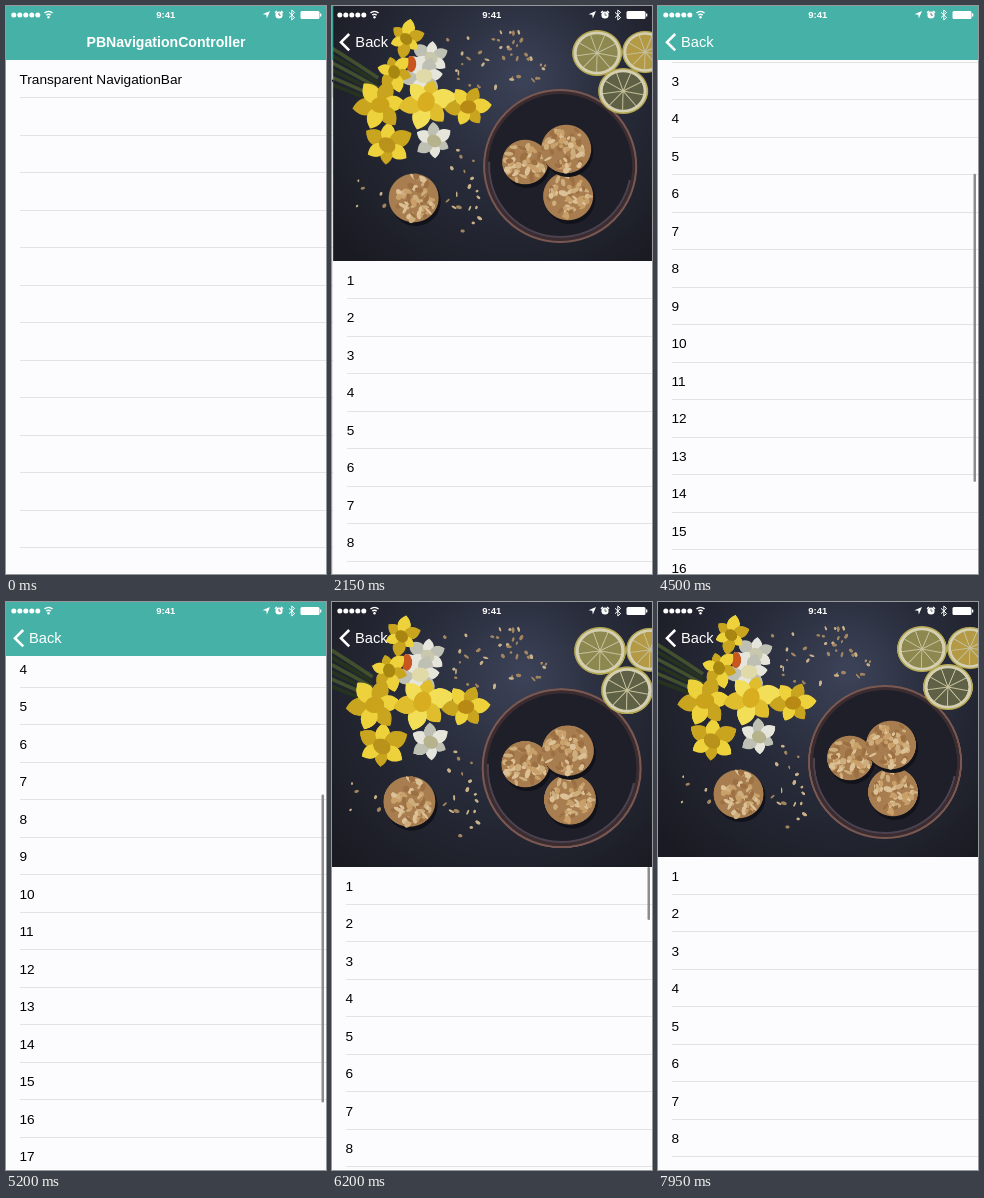
An HTML page with a canvas for the animation above (8000 ms loop, 320 by 568 pixels).

```html
<!DOCTYPE html>
<html lang="en">
<head>
<meta charset="utf-8">
<title>Navigation bar transition</title>
<style>
  html, body { margin: 0; width: 100%; height: 100%; overflow: hidden; background: #fcfcfe; }
  canvas { display: block; }
</style>
</head>
<body>
<canvas id="stage" width="320" height="568"></canvas>
<script>
const W = 320, H = 568, LOOP = 8000, ROW = 37.5, BAR = 54, HEADER = 255, ROWS = 20;
const TEAL = '#46b2a7', PAPER = '#fcfcfe', LINE = '#e3e3e2';
const SANS = '"Liberation Sans", Arial, sans-serif';
const ctx = document.getElementById('stage').getContext('2d');
const clamp = v => Math.max(0, Math.min(1, v));

function seeded(seed) {
  return () => (seed = (seed * 16807) % 2147483647) / 2147483647;
}

function ellipse(c, x, y, rx, ry, fill, angle = 0) {
  c.fillStyle = fill;
  c.beginPath();
  c.ellipse(x, y, rx, ry, angle, 0, 7);
  c.fill();
}

function stroke(c, color, width, path) {
  c.strokeStyle = color;
  c.lineWidth = width;
  c.beginPath();
  path(c);
  c.stroke();
}

// Header picture, 3:2, painted once at double size
const PHOTO_W = HEADER * 1.5;
const photo = paintPhoto();

function paintPhoto() {
  const canvas = document.createElement('canvas');
  canvas.width = PHOTO_W * 2;
  canvas.height = HEADER * 2;
  const c = canvas.getContext('2d'), rnd = seeded(77);
  c.scale(2, 2);
  c.translate((PHOTO_W - W) / 2, 0);
  const table = c.createRadialGradient(190, 70, 10, 170, 90, 220);
  table.addColorStop(0, '#3b4156');
  table.addColorStop(.4, '#292d3c');
  table.addColorStop(1, '#1a1b22');
  c.fillStyle = table;
  c.fillRect(-40, 0, 400, HEADER);

  const crumbs = (n, x, y, w, h) => {
    for (let i = 0; i < n; i++)
      ellipse(c, x + rnd() * w, y + rnd() * h, 1 + rnd() * 2, .8 + rnd(), rnd() < .5 ? '#a08560' : '#c9b189', rnd() * 3);
  };
  crumbs(46, 114, 26, 98, 56);
  crumbs(18, 102, 142, 45, 85);
  crumbs(5, 18, 160, 40, 45);

  for (let i = 0; i < 6; i++)
    stroke(c, i % 2 ? '#26331f' : '#42502d', 3.5, p => {
      p.moveTo(-35, 22 + i * 9);
      p.quadraticCurveTo(5, 45 + i * 7, 45, 72 + i * 5);
    });

  // Six pointed petals of uneven length around a trumpet
  const flower = (x, y, r, light, dark, heart) => {
    for (let i = 0; i < 6; i++) {
      const a = i * Math.PI / 3 + x, len = r * (.8 + rnd() * .35);
      c.save();
      c.translate(x, y);
      c.rotate(a);
      c.fillStyle = i % 2 ? light : dark;
      c.beginPath();
      c.moveTo(0, 0);
      c.quadraticCurveTo(len * .55, -len * .62, len, 0);
      c.quadraticCurveTo(len * .55, len * .62, 0, 0);
      c.fill();
      c.restore();
    }
    ellipse(c, x, y, r * .36, r * .3, heart, x);
  };
  const white = ['#e6e5dc', '#bfc0b4'], yellow = ['#eed23c', '#c9a41f'];
  flower(98, 52, 19, ...white, '#c9c8ac');
  flower(91, 70, 23, ...white, '#e0d9a8');
  flower(101, 135, 20, ...white, '#b5b28c');
  flower(73, 33, 18, ...yellow, '#a98612');
  ellipse(c, 78, 58, 5, 8, '#c8561f');
  flower(61, 66, 19, ...yellow, '#a9880f');
  flower(54, 139, 24, ...yellow, '#b8921a');
  flower(47, 99, 26, ...yellow, '#cba31b');
  flower(93, 96, 28, '#f3df57', '#dfbd2c', '#d8ad20');
  flower(135, 101, 22, ...yellow, '#b88a14');

  ellipse(c, 227, 160, 77, 77, '#3a2c30');
  ellipse(c, 227, 160, 72, 72, '#1e1f28');
  stroke(c, '#7a5852', 2, p => p.arc(227, 160, 76, 0, 7));
  stroke(c, '#4d4250', 2, p => p.arc(227, 160, 71, .2, 3.2));

  const cookie = (x, y, r) => {
    ellipse(c, x + 2, y + 3, r, r, '#12131a');
    ellipse(c, x, y, r, r * .97, '#a87d4f');
    for (let i = 0; i < 60; i++) {
      const a = rnd() * 7, d = Math.sqrt(rnd()) * r * .87;
      ellipse(c, x + Math.cos(a) * d, y + Math.sin(a) * d, 1.8 + rnd() * 3, 1.2 + rnd() * 1.8,
        ['#dcc096', '#c9a06a', '#cfae7e', '#9c7043'][i % 4], rnd() * 3);
    }
  };
  cookie(80.5, 192, 25);
  cookie(192, 156, 23);
  cookie(235, 190, 25);
  cookie(233, 143, 25);

  const lemon = (x, y, r, flesh) => {
    ellipse(c, x, y, r, r * .92, '#b3a650');
    ellipse(c, x, y, r * .94, r * .86, '#d3cfb0');
    ellipse(c, x, y, r * .82, r * .75, flesh);
    stroke(c, '#c4bf9a', 1, p => {
      for (let i = 0; i < 9; i++) {
        const a = i * Math.PI * 2 / 9 + .2;
        p.moveTo(x, y);
        p.lineTo(x + Math.cos(a) * r * .82, y + Math.sin(a) * r * .75);
      }
    });
  };
  lemon(264, 47, 25, '#8c8850');
  lemon(312, 46, 23, '#b59a45');
  lemon(290, 85, 25, '#5f6146');
  return canvas;
}

function text(str, x, y, size, color = '#000', weight = 'normal', align = 'left') {
  ctx.font = `${weight} ${size}px ${SANS}`;
  ctx.fillStyle = color;
  ctx.textAlign = align;
  ctx.fillText(str, x, y);
}

function rect(x, y, w, h, color) {
  ctx.fillStyle = color;
  ctx.fillRect(x, y, w, h);
}

function rows(top, count, label) {
  for (let i = 0; i < count; i++) {
    const y = top + i * ROW;
    if (y > H || y < -ROW) continue;
    rect(14, Math.round(y + ROW - .5), W - 14, 1, LINE);
    text(label(i), 13.5, y + 23.6, 13.65);
  }
}

// Scroll offset through time: [ms, px]
const SCROLL = [[3250, 0], [3600, 1], [3900, 37.5], [4200, 152], [4500, 273.5], [4800, 325], [5150, 328],
  [5450, 242], [5700, 127], [5950, 10], [6080, -13], [6200, -10], [6450, -2], [6750, 0], [8000, 0]];

function scrollAt(t) {
  const i = SCROLL.findIndex(p => p[0] > t);
  if (i < 1) return 0;
  const slope = k => {
    const a = SCROLL[k - 1], b = SCROLL[k + 1];
    return a && b ? (b[1] - a[1]) / (b[0] - a[0]) : 0;
  };
  const [t0, v0] = SCROLL[i - 1], [t1, v1] = SCROLL[i];
  const d = t1 - t0, u = (t - t0) / d, w = 1 - u;
  return w * w * (1 + 2 * u) * v0 + u * u * (3 - 2 * u) * v1 + u * w * d * (w * slope(i - 1) - u * slope(i));
}

function menuScreen(highlight) {
  rect(0, 0, W, H, PAPER);
  if (highlight) rect(0, BAR, W, ROW, '#d9d9d9');
  rows(BAR, 14, i => i ? '' : 'Transparent NavigationBar');
  rect(0, 0, W, BAR, TEAL);
}

function detailScreen(offset, indicator) {
  const edge = HEADER - offset;
  rect(0, 0, W, H, PAPER);
  rows(edge, ROWS, i => i + 1);
  if (edge > 0) {
    const scale = Math.max(edge / HEADER, W / PHOTO_W);
    const w = PHOTO_W * scale, h = HEADER * scale;
    ctx.save();
    ctx.beginPath();
    ctx.rect(0, 0, W, edge);
    ctx.clip();
    ctx.drawImage(photo, (W - w) / 2, (edge - h) / 2, w, h);
    ctx.restore();
  }
  if (indicator) {
    // The bar shrinks further while the list is pulled past its top
    const bottom = 328 + .54 * offset + Math.min(0, offset) * .46, top = Math.max(edge, bottom - 308);
    ctx.globalAlpha = indicator;
    ctx.fillStyle = '#8c8c8c';
    ctx.beginPath();
    ctx.roundRect(315.5, top, 2.5, bottom - top, 1.2);
    ctx.fill();
    ctx.globalAlpha = 1;
  }
  if (edge < BAR) rect(0, 0, W, BAR, TEAL);
}

function statusBar() {
  const white = '#fff';
  for (let i = 0; i < 5; i++) ellipse(ctx, 7.8 + i * 6, 9, 2.5, 2.5, white);
  for (const r of [3.2, 6]) stroke(ctx, white, 1.5, p => p.arc(42.5, 11.5, r, -2.3, -.84));
  ellipse(ctx, 42.5, 11.2, 1.2, 1.2, white);
  text('9:41', 159.7, 12.3, 9.5, white, 'bold', 'center');
  ctx.beginPath();
  for (const [x, y] of [[264, 5], [260.8, 12.5], [260.3, 8.8], [256.5, 8.3]]) ctx.lineTo(x, y);
  ctx.fill();
  ellipse(ctx, 273, 9, 3.6, 3.6, white);
  stroke(ctx, white, 1.4, p => {
    p.moveTo(269, 6.8); p.lineTo(271, 5);
    p.moveTo(277, 6.8); p.lineTo(275, 5);
  });
  stroke(ctx, '#5b7772', .9, p => { p.moveTo(273, 6.8); p.lineTo(273, 9.2); p.lineTo(274.8, 9.2); });
  stroke(ctx, white, 1, p => {
    for (const [x, y] of [[283, 6.3], [288.6, 11.6], [285.8, 14], [285.8, 4], [288.6, 6.4], [283, 11.7]]) p.lineTo(x, y);
  });
  ctx.fillStyle = white;
  ctx.beginPath();
  ctx.roundRect(294.5, 5, 19, 8, 1.5);
  ctx.fill();
  rect(314, 7.5, 1.3, 3, white);
}

function navItems(progress) {
  ctx.globalAlpha = clamp(1 - progress * 1.6);
  text('PBNavigationController', 160 - 105 * progress, 41, 14.1, '#fff', 'bold', 'center');
  ctx.globalAlpha = clamp(progress * 1.6 - .6);
  text('Back', 23 + 105 * (1 - progress), 41, 14.7, '#fff');
  stroke(ctx, '#fff', 2.6, p => { p.moveTo(17.2, 28); p.lineTo(9, 36.2); p.lineTo(17.2, 44.4); });
  ctx.globalAlpha = 1;
}

function draw(t) {
  const s = Math.max(0, t - 1600) * .0142;
  const remaining = t > 2350 ? 0 : (1 + s) * Math.exp(-s);
  const x = remaining * W, progress = 1 - remaining;
  if (remaining) {
    ctx.save();
    ctx.translate(-.3 * W * progress, 0);
    menuScreen(t >= 1550);
    ctx.restore();
    rect(0, 0, x, H, `rgba(0,0,0,${.1 * progress})`);
  }
  if (remaining < 1) {
    const indicator = clamp((t - 3550) / 100) * clamp((6950 - t) / 250);
    ctx.save();
    ctx.translate(x, 0);
    detailScreen(scrollAt(t), indicator);
    ctx.restore();
  }
  navItems(progress);
  statusBar();
}

function frame() {
  draw(performance.now() % LOOP);
  requestAnimationFrame(frame);
}
frame();
</script>
</body>
</html>
```
